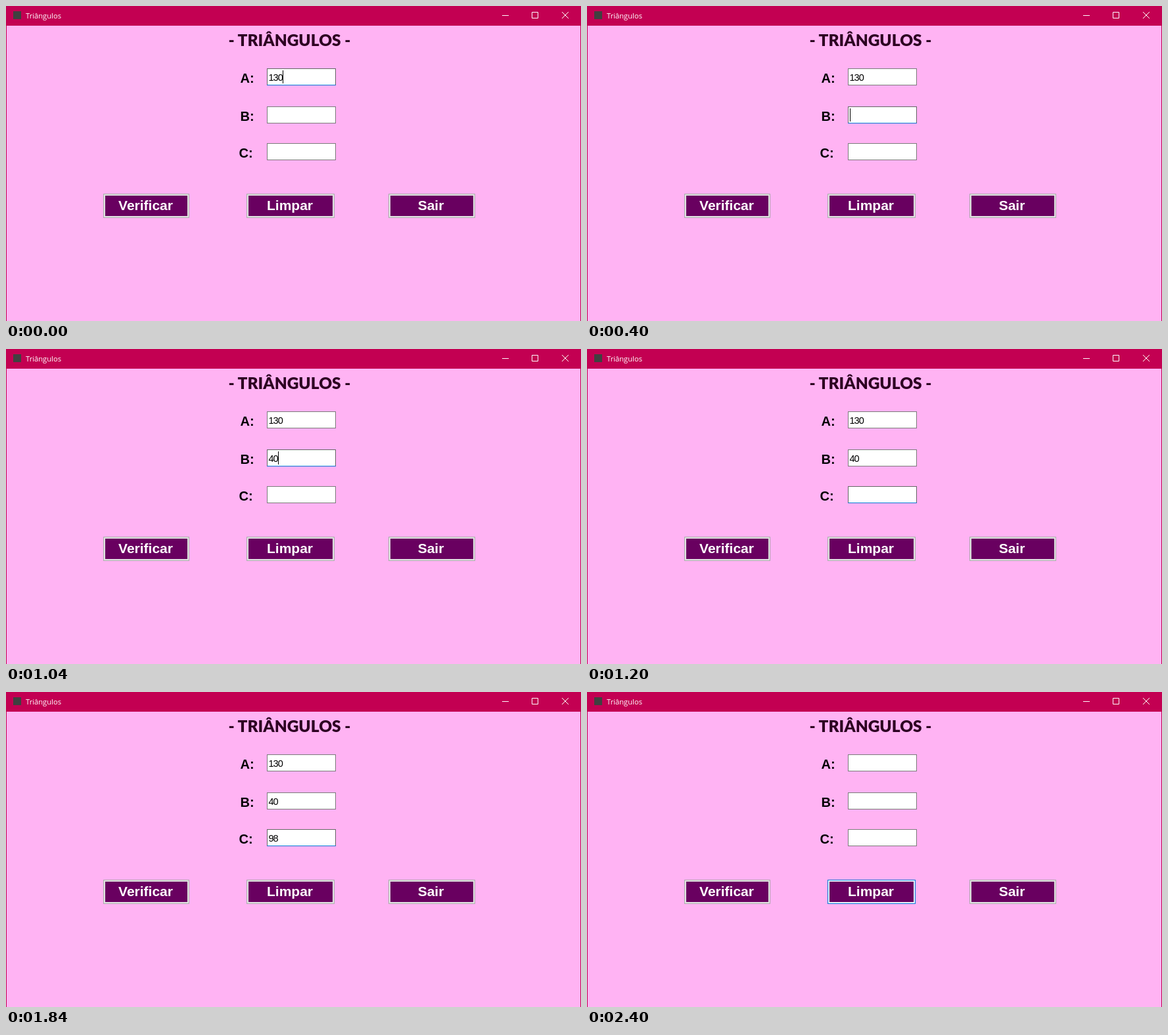
Write an HTML page that moves like this. It is 875x480 px and loops after 2.8 s.

```html
<!DOCTYPE html>
<html lang="pt">
<head>
<meta charset="utf-8">
<title>Triângulos</title>
<style>
  html, body { margin: 0; width: 100%; height: 100%; overflow: hidden; background: #ffb3f3; }
  svg { display: block; width: 875px; height: 480px; }
  rect { shape-rendering: crispEdges; }
  .ui { font: 11.2px "Open Sans", "Noto Sans", sans-serif; }
  .heading { font: 900 24.5px Lato, sans-serif; fill: #2d0222; }
  .label { font: bold 20px "Liberation Sans", Arial, sans-serif; }
  .button { font: bold 21px "Liberation Sans", Arial, sans-serif; fill: #fff; }
  .value { font: 14.5px "Liberation Sans", Arial, sans-serif; letter-spacing: -1px; }
  .middle { text-anchor: middle; }
  .shadow { filter: drop-shadow(0 4px 7px rgba(0, 0, 0, .5)); }
</style>
</head>
<body>
<svg id="stage" viewBox="0 0 875 480"></svg>
<script>
const STEP = 400;
const ACCENT = '#c30052', BLUE = '#0078d7';

const steps = [
  { values: ['130', '', ''], focus: 0, caret: 421 },
  { values: ['130', '', ''], focus: 1, caret: 400 },
  { values: ['130', '40', ''], focus: 1, caret: 414 },
  { values: ['130', '40', ''], focus: 2 },
  { values: ['130', '40', '98'], focus: 2 },
  { values: ['130', '40', '98'], dialog: true },
  { values: ['', '', ''], hover: 1 },
];

const fields = [
  { name: 'A:', labelX: 356.5, y: 95 },
  { name: 'B:', labelX: 356.5, y: 153 },
  { name: 'C:', labelX: 354.5, y: 209 },
];

const buttons = [
  { name: 'Verificar', x: 148, w: 131, textX: 212.5 },
  { name: 'Limpar', x: 366, w: 134, textX: 432 },
  { name: 'Sair', x: 582, w: 132, textX: 646.5 },
];

const rect = (x, y, w, h, fill) =>
  `<rect x="${x}" y="${y}" width="${w}" height="${h}" fill="${fill}"/>`;

const text = (x, y, style, content, fill = '') =>
  `<text x="${x}" y="${y}" class="${style}"${fill && ` fill="${fill}"`}>${content}</text>`;

const line = (d, color) => `<path d="${d}" fill="none" stroke="${color}"/>`;

const cross = (x, y, color) =>
  line(`M${x} ${y}l10 10m0 -10l-10 10`, color);

function titleBar(active) {
  const ink = active ? '#fff' : '#999';
  const edge = active ? ACCENT : '#66457f';
  return rect(0, 30, 1, 450, edge) + rect(874, 30, 1, 450, edge)
    + rect(0, 0, 875, 30, active ? ACCENT : '#fff')
    + rect(11, 8, 12, 12, '#404040')
    + text(30, 19, 'ui', 'Triângulos', ink)
    + line('M755 14.5h10M800.5 9.5h9v9h-9z', ink)
    + cross(846, 9, ink);
}

function field({ name, labelX, y }, value, focused, caret) {
  return text(labelX, y + 22, 'label', name)
    + rect(397, y, 105, 26, focused ? '#646464' : '#7a7a7a')
    + rect(398, y + 1, 103, 24, '#fff')
    + (focused ? rect(397, y + 25, 105, 1, BLUE) : '')
    + text(399.5, y + 19, 'value', value)
    + (focused && caret ? rect(caret, y + 3, 1, 20, '#000') : '');
}

function button({ name, x, w, textX }, isDefault, hovered) {
  const border = isDefault ? 2 : 1;
  return rect(x, 286, w, 37, isDefault || hovered ? BLUE : '#adadad')
    + rect(x + border, 286 + border, w - 2 * border, 37 - 2 * border, hovered ? '#e5f1fb' : '#e1e1e1')
    + rect(x + 3, 289, w - 6, 31, '#690060')
    + text(textX, 311, 'button middle', name);
}

function messageBox() {
  return `<g class="shadow">${rect(311, 294, 142, 133, ACCENT)}</g>`
    + rect(312, 325, 140, 59, '#fff')
    + rect(312, 384, 140, 42, '#f0f0f0')
    + cross(432, 304, '#fff')
    + text(322.5, 359, 'ui', 'Triângulo Escaleno')
    + rect(363, 394, 73, 21, BLUE)
    + rect(365, 396, 69, 17, '#e1e1e1')
    + text(399.5, 409, 'ui middle', 'OK');
}

function scene({ values, focus, caret, dialog, hover }) {
  return rect(0, 0, 875, 480, '#ffb3f3')
    + titleBar(!dialog)
    + text(431.5, 61, 'heading middle', '- TRIÂNGULOS -')
    + fields.map((f, i) => field(f, values[i], i === focus, caret)).join('')
    + buttons.map((b, i) => button(b, dialog && i === 0, i === hover)).join('')
    + (dialog ? messageBox() : '');
}

const stage = document.getElementById('stage');
const start = performance.now();
let shown = -1;

function tick() {
  const index = Math.floor((performance.now() - start) / STEP) % steps.length;
  if (index !== shown) {
    shown = index;
    stage.innerHTML = scene(steps[index]);
  }
  requestAnimationFrame(tick);
}
tick();
</script>
</body>
</html>
```
